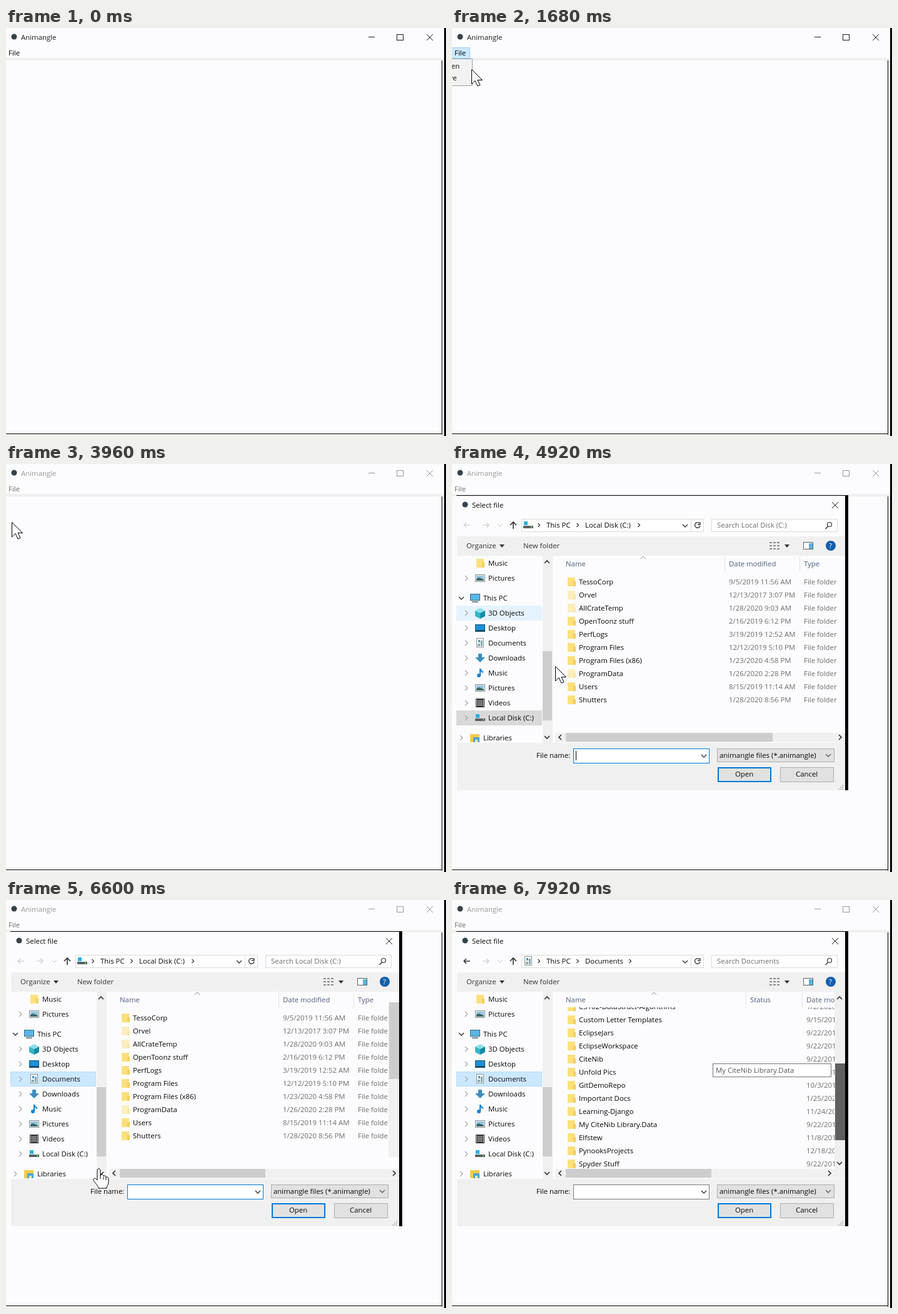
An HTML page for the animation above (8000 ms loop, 704 px wide and 654 px high).

```html
<!DOCTYPE html>
<html lang="en">
<head>
<meta charset="utf-8">
<title>Animangle</title>
<style>
html, body { margin: 0; width: 100%; height: 100%; overflow: hidden; background: #fcfcfe; }
svg { display: block; width: 704px; height: 654px; }
text { font: 11.4px "Open Sans", "Noto Sans", sans-serif; white-space: pre; }
</style>
</head>
<body>
<script>
const LOOP = 8000;
const PANEL = '#f0f0f0', THUMB = '#cdcdcd', BUTTON = '#e1e1e1', EDGE = '#adadad', RULE = '#e2e2e2';
const BLACK = '#080808', INK = '#333', DIM = '#6d6d6d', HEAD = '#4c607a', PALE = '#a6a6a6', BLUE = '#0078d7';
const rules = [];
const pct = ms => (ms / LOOP * 100).toFixed(3) + '%';

// Drawing helpers; text is placed by its vertical centre.
const rect = (x, y, w, h, fill, extra = '') =>
  `<rect x="${x}" y="${y}" width="${w}" height="${h}" fill="${fill}" ${extra}/>`;
const box = (x, y, w, h, fill, stroke, width = 1) =>
  rect(x + .5, y + .5, w - 1, h - 1, fill, `stroke="${stroke}" stroke-width="${width}"`);
const text = (x, y, label, fill = BLACK) =>
  `<text x="${x}" y="${y + 4}" fill="${fill}">${label}</text>`;
const line = (d, stroke = INK, width = 1.2) =>
  `<path d="${d}" fill="none" stroke="${stroke}" stroke-width="${width}"/>`;
const shape = (d, fill) => `<path d="${d}" fill="${fill}"/>`;
const clip = (id, x, y, w, h, body) =>
  `<clipPath id="${id}">${rect(x, y, w, h, '#000')}</clipPath><g clip-path="url(#${id})">${body}</g>`;
const right = (x, y, c = INK, r = 3) => line(`M${x - r / 2} ${y - r}l${r} ${r} ${-r} ${r}`, c);
const left = (x, y, c = INK) => line(`M${x + 2} ${y - 4}l-4 4 4 4`, c, 1.7);
const down = (x, y, c = INK, w = 1.4) => line(`M${x - 4} ${y - 2}l4 4 4-4`, c, w);
const up = (x, y, c = INK, w = 1.7) => line(`M${x - 4} ${y + 2}l4-4 4 4`, c, w);
const arrow = (x, y, dir, c) =>
  line(`M${x - 5 * dir} ${y}h${10 * dir}m${-4 * dir} -4l${4 * dir} 4 ${-4 * dir} 4`, c, 1.5);

// Hard switch: the body is seen only between two times.
function span(from, to, body) {
  const name = 'show' + rules.length;
  rules.push(`@keyframes ${name}{0%{opacity:${+(from === 0)}}` +
    (from ? `${pct(from)}{opacity:1}` : '') + (to < LOOP ? `${pct(to)}{opacity:0}` : '') + '}');
  return `<g style="animation:${name} ${LOOP}ms step-end infinite">${body}</g>`;
}

// Moves the body through [time, x, y] stops.
function move(stops, body) {
  const name = 'move' + rules.length;
  const keys = [[0, ...stops[0].slice(1)], ...stops, [LOOP, ...stops.at(-1).slice(1)]];
  rules.push(`@keyframes ${name}{` +
    keys.map(([t, x, y]) => `${pct(t)}{transform:translate(${x}px,${y}px)}`).join('') + '}');
  return `<g style="animation:${name} ${LOOP}ms linear infinite">${body}</g>`;
}

const appMark = (x, y) => `<circle cx="${x}" cy="${y}" r="4.5" fill="#34434b"/>`;

const icons = {
  folder: (x, y, faint) => `<g opacity="${faint ? .5 : 1}">` + rect(x - 6, y - 7, 12, 14, '#fde07c') +
    rect(x + 3, y - 1, 4, 8, '#f3cf60') + '</g>',
  picture: (x, y) => box(x - 8, y - 6, 16, 12, '#f2f5f6', '#878c90') + rect(x - 6, y - 4, 12, 5, '#8fc6e4') +
    shape(`M${x - 6} ${y + 4}v-3l4-2 8 3v2z`, '#3b6663'),
  monitor: (x, y) => box(x - 8, y - 7, 16, 11, '#58b6e8', '#3b6a80') + rect(x - 5, y + 5, 10, 2, '#6f8890'),
  cube: (x, y) => shape(`M${x - 8} ${y - 4}l8-4 8 4-8 4z`, '#8be0e8') +
    shape(`M${x - 8} ${y - 4}l8 4v9l-8-4z`, '#35b6c8') + shape(`M${x + 8} ${y - 4}l-8 4v9l8-4z`, '#168ca4'),
  desktop: (x, y) => box(x - 8, y - 6, 16, 12, '#1b91d8', '#14506e') + rect(x - 8, y + 3, 16, 3, '#14506e'),
  page: (x, y) => box(x - 6, y - 8, 12, 15, '#fcfcfc', '#8b9595') + rect(x - 3, y - 5, 3, 4, '#4a9ab5') +
    rect(x + 1, y - 4, 3, 9, '#87a9b0') + rect(x - 4, y + 1, 4, 4, '#87a9b0'),
  download: (x, y) => shape(`M${x - 3} ${y - 7}h6v6h5l-8 8-8-8h5z`, '#3e8dc0'),
  note: (x, y) => line(`M${x} ${y + 4}v-11q1 4 5 6`, '#1583d0', 2) + `<circle cx="${x - 2}" cy="${y + 4}" r="3" fill="#1583d0"/>`,
  film: (x, y) => rect(x - 7, y - 7, 14, 14, '#2b2f33') + rect(x - 4, y - 5, 8, 10, '#77757a') +
    line(`M${x - 5.5} ${y - 6}v12M${x + 5.5} ${y - 6}v12`, '#ddd', 1),
  drive: (x, y) => rect(x - 8, y + 1, 16, 4, '#59605f') + rect(x + 4, y + 2, 2, 2, '#66e070') + rect(x - 7, y - 6, 6, 6, '#28b0e0'),
  library: (x, y) => rect(x - 8, y - 6, 15, 13, '#f5ca49') + rect(x - 3, y - 1, 10, 8, '#4aa7d8') + rect(x, y + 3, 4, 4, '#f6e9a5')
};

function frame() {
  const bar = (ink, fileInk) => text(24, 15, 'Animangle', ink) + text(4, 40, 'File', fileInk) +
    line('M580 14.5h10M673 10l10 10M683 10l-10 10', ink, 1) + box(625, 10, 11, 10, 'none', ink);
  return rect(0, 0, 704, 654, '#fcfcfe') + rect(0, 48, 701, 4, PANEL) + rect(698, 50, 3, 604, PANEL) +
    rect(0, 652, 701, 2, PANEL) + rect(697, 52, 1, 600, '#000') + rect(0, 650, 698, 1, '#000') +
    rect(701, 0, 3, 654, '#000') + appMark(13, 14) +
    span(1120, 2160, box(-2, 31, 31, 18, '#cce8ff', '#99d1ff')) +
    span(0, 2400, bar('#1c1c1c', '#000')) + span(2400, LOOP, bar('#999', DIM));
}

const menu = () => box(-30, 49, 63, 44, '#f2f2f2', '#a0a0a0') + text(-17, 61, 'Open') + text(-17, 80, 'Save');

function sidebar() {
  const entries = [['Music', 159, 'folder'], ['Pictures', 183, 'picture'], ['This PC', 215, 'monitor', 1],
    ['3D Objects', 239, 'cube'], ['Desktop', 263, 'desktop'], ['Documents', 287, 'page'],
    ['Downloads', 311, 'download'], ['Music', 335, 'note'], ['Pictures', 359, 'picture'],
    ['Videos', 383, 'film'], ['Local Disk (C:)', 407, 'drive'], ['Libraries', 439, 'library', 1]];
  const mark = (y, fill) => rect(7, y - 12, 137, 24, fill);
  const hover = '#e5f3ff';
  const rows = entries.map(([label, y, icon, root]) => {
    const x = root ? 37 : 45;
    const chevron = y === 159 ? '' : y === 215 ? down(15, y) : right(root ? 15 : 23, y, PALE, 4);
    return chevron + icons[icon](x, y) + text(x + 13, y, label);
  }).join('');
  return span(4640, 5040, mark(239, hover)) + span(5200, 5600, mark(311, hover)) +
    span(6080, 6400, mark(287, hover)) + span(0, 6400, mark(407, '#d9d9d9')) +
    span(6400, LOOP, box(7, 275, 137, 24, '#cce8ff', '#b4ddfb')) +
    clip('side', 7, 147, 138, 300, rows) +
    rect(145, 147, 16, 300, PANEL) + rect(145, 300, 15, 111, THUMB) + up(152, 157) + down(152, 438, INK, 1.7);
}

function toolbar() {
  const crumbs = (icon, place, end, back) => arrow(24, 98, -1, back) + icons[icon](122, 98) +
    text(213, 98, place) + right(end, 98) + text(424, 98, 'Search ' + place, DIM);
  return appMark(21, 65) + text(32, 66, 'Select file') + line('M608 61l10 10M618 61l-10 10', '#222', 1) +
    box(111, 88, 292, 21, '#fff', '#d9d9d9') + line('M382.5 89v19', '#d9d9d9', 1) + box(415, 88, 202, 21, '#fff', '#d9d9d9') +
    arrow(54, 98, 1, '#d4d4d4') + down(77, 98, '#c4c4c4', 1) + line('M98 104v-11m-5 5l5-5 5 5', INK, 1.6) +
    right(139, 98) + text(151, 98, 'This PC') + right(201, 98) + down(373, 99) +
    line('M396 95a4.3 4.3 0 1 0 1 4M397 93v4h-4', INK, 1.3) +
    `<circle cx="604" cy="97" r="3.5" fill="none" stroke="${INK}" stroke-width="1.2"/>` + line('M601.5 100l-4 4', INK, 1.5) +
    span(0, 6720, crumbs('drive', 'Local Disk (C:)', 299, '#d4d4d4')) + span(6720, LOOP, crumbs('page', 'Documents', 285, INK)) +
    rect(8, 116, 621, 31, PANEL) + text(23, 131, 'Organize', INK) + shape('M76 129h8l-4 5z', INK) +
    text(114, 131, 'New folder', INK) +
    [126, 131, 136].map(y => line(`M508 ${y}h4M514 ${y}h4M520 ${y}h4`, '#8a8a8a', 2)).join('') +
    shape('M532 129h8l-4 5z', INK) + box(562, 125, 16, 12, '#fff', '#59606a') + rect(571, 127, 6, 9, '#58b4e0') +
    '<circle cx="606" cy="131" r="8" fill="#125fab"/>' + text(603, 131, '?', '#fff');
}

function diskList() {
  const rows = [['TessoCorp', '9/5/2019 11:56 AM'], ['Orvel', '12/13/2017 3:07 PM', 1],
    ['AllCrateTemp', '1/28/2020 9:03 AM', 1], ['OpenToonz stuff', '2/16/2019 6:12 PM'],
    ['PerfLogs', '3/19/2019 12:52 AM'], ['Program Files', '12/12/2019 5:10 PM'],
    ['Program Files (x86)', '1/23/2020 4:58 PM'], ['ProgramData', '1/26/2020 2:28 PM', 1],
    ['Users', '8/15/2019 11:14 AM'], ['Shutters', '1/28/2020 8:56 PM']];
  return up(306, 150, '#8d8d8d', 1) + text(182, 160, 'Name', HEAD) + text(443, 160, 'Date modified', HEAD) +
    text(563, 160, 'Type', HEAD) + line('M436.5 148v25M556.5 148v25', RULE, 1) +
    rows.map(([name, date, faint], i) => {
      const y = 189 + 21 * i;
      return icons.folder(191, y, faint) + text(203, y, name) +
        text(443, y, date, DIM) + text(563, y, 'File folder', DIM);
    }).join('');
}

function documentList() {
  const rows = [['Animations', '1/28/2020'], ['Backups', '9/22/2019'], ['Budget', '10/3/2019'],
    ['Class Notes', '9/22/2019'], ['Coding', '11/8/2019'], ['Course Work', '9/22/2019'],
    ['CS100-Intro', '9/22/2019'], ['CS101-Programming', '9/22/2019'], ['CS101-Projects', '9/22/2019'],
    ['CS102-DataStruct-Algorithms', '1/2/2020'], ['Custom Letter Templates', '9/15/2019'],
    ['EclipseJars', '9/22/2019'], ['EclipseWorkspace', '9/22/2019'], ['CiteNib', '9/22/2019'],
    ['Unfold Pics', '9/22/2019'], ['GitDemoRepo', '10/3/2019'], ['Important Docs', '1/25/2020'],
    ['Learning-Django', '11/24/2019'], ['My CiteNib Library.Data', '9/22/2019'], ['Elfstew', '11/8/2019'],
    ['PynooksProjects', '12/18/2019'], ['Spyder Stuff', '9/22/2019'], ['Templates', '9/22/2019']];
  const body = rows.map(([name, date], i) => {
    const y = 189 + 21 * i;
    return icons.folder(191, y) + text(203, y, name) + text(567, y, date, DIM);
  }).join('');
  return up(323, 150, '#8d8d8d', 1) +
    clip('head', 165, 147, 447, 26, text(182, 160, 'Name', HEAD) + text(477, 160, 'Status', HEAD) + text(567, 160, 'Date modified', HEAD)) +
    line('M470.5 148v25M560.5 148v25', RULE, 1) +
    clip('docs', 165, 172, 447, 258, move([[7240, 0, 0], [7800, 0, -207]], body));
}

function scrollbars() {
  const thumb = fill => rect(613, 164, 16, 123, fill);
  return rect(165, 431, 464, 15, PANEL) + left(173, 438) +
    span(0, 6560, rect(182, 431, 331, 14, THUMB)) + span(6560, LOOP, rect(182, 431, 233, 14, THUMB)) +
    span(0, 6720, line('M619 434l4 4-4 4', INK, 1.7)) + span(6720, LOOP, line('M602 434l4 4-4 4', INK, 1.7)) +
    span(6560, 6720, rect(612, 164, 17, 248, PANEL) + thumb(THUMB)) +
    span(6720, LOOP, rect(612, 147, 17, 284, PANEL) + up(620, 157) + down(620, 422, INK, 1.7) +
      move([[7240, 0, 0], [7800, 0, 98]], span(6720, 7240, thumb(THUMB)) + span(7240, LOOP, thumb('#606060'))));
}

function footer() {
  const caret = rect(198, 460, 1, 15, '#000');
  return rect(8, 447, 621, 76, PANEL) + text(135, 467, 'File name:') +
    span(0, 7200, box(194, 456, 218, 24, '#fff', BLUE)) + span(7200, LOOP, box(194, 456, 218, 24, '#fff', '#7a7a7a')) +
    down(403, 468) + span(4240, 5240, caret) + span(5760, 6280, caret) +
    box(424, 456, 188, 22, BUTTON, EDGE) + text(428, 467, 'animangle files (*.animangle)') + down(602, 467, '#606060') +
    rect(426, 487, 84, 22, BUTTON, `stroke="${BLUE}" stroke-width="2"`) + text(453, 497, 'Open') +
    box(525, 486, 86, 24, BUTTON, EDGE) + text(550, 497, 'Cancel') +
    [[624, 514], [624, 517], [624, 520], [621, 517], [621, 520], [618, 520]].map(([x, y]) => rect(x, y, 2, 2, '#bfbfbf')).join('');
}

const dialog = () => rect(7, 50, 627, 473, '#000') + rect(7, 51, 622, 472, '#fcfcfe') + toolbar() + sidebar() +
  span(0, 6560, clip('disk', 165, 147, 464, 283, diskList())) +
  span(6560, 6720, clip('narrow', 165, 147, 447, 283, diskList())) +
  span(6720, LOOP, documentList()) + scrollbars() + footer() +
  span(7680, LOOP, box(417, 262, 190, 22, '#fff', '#767676') + text(422, 273, 'My CiteNib Library.Data', '#575757'));

function cursor() {
  const outline = d => `<path d="${d}" fill="#fff" stroke="#000" stroke-linejoin="round"/>`;
  const pointer = outline('M.5 .5V24L6 18.5L10 27 14 25.5 10 17.5H17.5Z');
  const hand = outline('M-4 2C-4-1 1-1 1 2V11C3 8 6 9 6 12 8 10 10 11 10 14 12 12 14 13 14 16V22C14 26 11 27 11 31H-2C-2 28-6 24-9 20-12 16-8 14-6 16L-4 18Z') +
    line('M1 11v5M6 13v4M10 14v4', '#000', 1);
  const stops = [[320, 708, 441], [640, 430, 230], [1120, 12, 38], [1440, 14, 40], [1640, 31, 66], [1720, 31, 66],
    [1840, 48, 96], [2040, 10, 62], [2960, 10, 62], [3640, 9, 93], [3980, 9, 93], [4400, 60, 150], [4720, 110, 238],
    [4880, 165, 324], [4980, 165, 324], [5080, 160, 440], [5280, 112, 310], [5440, 137, 475], [5640, 137, 480],
    [6120, 80, 287], [6400, 80, 287], [6580, 150, 431], [6620, 150, 431], [6680, 164, 432], [6880, 400, 300],
    [7120, 619, 210], [7240, 619, 210], [7720, 640, 300], [7840, 708, 315]];
  return move(stops, span(0, 4320, pointer) + span(4320, 4880, hand) + span(4880, 5200, pointer) +
    span(5200, 5600, hand) + span(5600, 5800, pointer) + span(5800, 6680, hand) + span(6680, LOOP, pointer));
}

const scene = frame() + span(1280, 2160, menu()) + span(4160, LOOP, dialog()) + cursor();
document.body.innerHTML =
  `<style>${rules.join('')}</style><svg viewBox="0 0 704 654" xmlns="http://www.w3.org/2000/svg">${scene}</svg>`;
</script>
</body>
</html>
```
